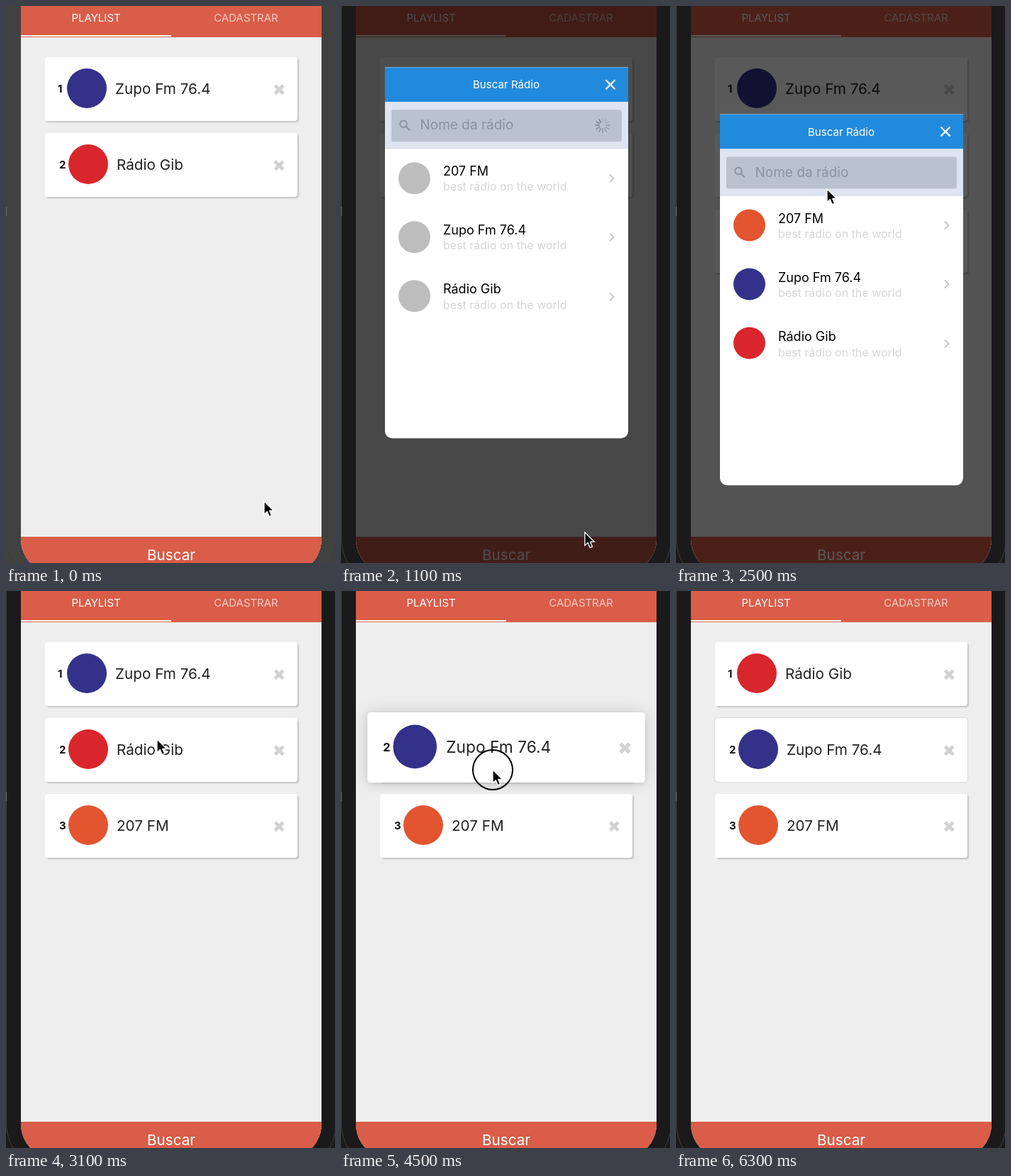
Animation, 464 px wide and 785 px high, one loop 6400 ms. Source, as an HTML page:

```html
<!DOCTYPE html>
<html lang="pt-BR">
<head>
<meta charset="utf-8">
<style>
  html, body { margin: 0; width: 100%; height: 100%; overflow: hidden; background: #1a1a1a; }
  div, svg { position: absolute; box-sizing: border-box; }
  svg { overflow: visible; left: 0; top: 0; }
  #stage { left: 0; top: 0; width: 464px; height: 785px; overflow: hidden; background: #1a1a1a;
    font-family: Inter, "Open Sans", sans-serif; }
  #stage.light { background: #414141; }
  .text { white-space: nowrap; line-height: 30px; height: 30px; }
  .mid { transform: translateX(-50%); }
  #edge { left: 0; top: -100px; width: 466px; height: 922px; border-radius: 72px; border: 1px solid #3d3d3d; border-top: 0; }
  #mark { left: 0; top: 283px; width: 1px; height: 13px; background: #777; }
  #screen { left: 21px; top: -100px; width: 424px; height: 901px; border-radius: 50px; overflow: hidden; background: #eee; }
  #page { left: -21px; top: 100px; width: 464px; height: 801px; }
  #tabs { left: 21px; top: 0; width: 424px; height: 43.5px; background: #d95d48; }
  #line { left: 21px; top: 41.3px; width: 212px; height: 2.2px; background: #fff; }
  #button { left: 21px; top: 748px; width: 424px; height: 53px; background: #d95d48; }
  .tab { top: 1.5px; font-size: 15px; color: #fff; }
  .card { left: 55px; top: 72px; width: 356px; height: 90px; border-radius: 4px; background: #fff; }
  .body { left: 0; top: 0; }
  .num { left: 18px; top: 30px; font-size: 15px; font-weight: 700; color: #111; }
  .logo { left: 31px; top: 16px; width: 56px; height: 56px; border-radius: 50%; }
  .name { left: 99px; top: 30px; font-size: 20.7px; color: #222; }
  #dim { left: 0; top: 0; width: 464px; height: 801px; background: #000; }
  #modal { left: 61.5px; top: 86px; width: 343px; height: 523px; border-radius: 0 0 10px 10px; overflow: hidden; background: #fff; }
  #head { left: 0; top: 0; width: 100%; height: 49px; background: #228adc; }
  #search { left: 0; top: 49px; width: 100%; height: 66px; background: #dfe5f0; border-bottom: 1px solid #d8dde6; }
  #field { left: 9px; top: 11px; width: 325px; height: 45px; border-radius: 3px; background: #bac2d0; }
  .item { left: 0; width: 100%; height: 83px; }
  .avatar { left: 19px; top: 18.5px; width: 45px; height: 45px; border-radius: 50%; }
  .title { left: 82.5px; top: 16.5px; font-size: 18px; color: #000; }
  .sub { left: 82.5px; top: 38px; font-size: 16px; color: #d6d6d6; }
</style>
</head>
<body>
<div id="stage">
  <div id="edge"></div>
  <div id="mark"></div>
  <div id="screen"><div id="page">
    <div id="tabs"></div>
    <div id="line"></div>
    <div class="text mid tab" style="left:127px">PLAYLIST</div>
    <div class="text mid tab" style="left:338.5px;opacity:.68">CADASTRAR</div>
    <div id="cards"></div>
    <div id="button"><div class="text mid" style="left:212px;top:10.5px;font-size:20.7px;color:#fff">Buscar</div></div>
    <div id="dim"></div>
    <div id="modal">
      <div id="head">
        <div class="text mid" style="left:171.5px;top:10px;font-size:15.1px;color:#fff">Buscar Rádio</div>
        <svg><path d="M311.5 18l13 13m0-13l-13 13" stroke="#fff" stroke-width="2.4"/></svg>
      </div>
      <div id="search">
        <div id="field"></div>
        <svg fill="none" stroke="#8a929e" stroke-width="2"><circle cx="26" cy="31" r="4.8"/><path d="M29.5 34.5l5.5 5.5"/></svg>
        <div class="text" style="left:50px;top:18px;font-size:19px;color:#8a929e">Nome da rádio</div>
        <svg id="spinner"></svg>
      </div>
      <div id="items"></div>
    </div>
  </div></div>
  <svg id="ring"><circle r="28" fill="none" stroke="#000" stroke-width="2"/></svg>
  <svg id="cursor"><path d="M0 0V18.5L4.3 14.6 7.2 21.6 10.6 20.2 7.7 13.3H13.4Z" fill="#000" stroke="#fff" stroke-width="1.3"/></svg>
</div>
<script>
const LOOP = 6400, STEP = 100, PITCH = 107, GRAB_Y = 148.5;
const $ = id => document.getElementById(id);

const stations = {
  zupo: { name: 'Zupo Fm 76.4', color: '#34318a' },
  gib: { name: 'Rádio Gib', color: '#d9262c' },
  fm: { name: '207 FM', color: '#e2552f' }
};

// time, x, y of the pointer tip
const path = [
  [0, 364, 698], [600, 349, 762], [1000, 349, 762], [1800, 230, 291],
  [2200, 213, 258], [2700, 213, 258], [3100, 213, 209], [3500, 214, GRAB_Y],
  [3900, 214, GRAB_Y], [4500, 214, 252], [4900, 214, 255.5], [5500, 214, 255.5],
  [6200, 250, 800], [LOOP, 250, 800]
];
const presses = [[600, 800], [2300, 2400], [3500, 5400]];

const clamp = v => Math.min(1, Math.max(0, v));
const mix = (a, b, p) => a + (b - a) * p;
const within = (t, [a, b]) => t >= a && t < b;

// cubic-bezier(.25, .1, .25, 1)
function ease(x) {
  const curve = (a, b, u) => 3 * a * u * (1 - u) ** 2 + 3 * b * u * u * (1 - u) + u ** 3;
  let lo = 0, hi = 1;
  for (let i = 0; i < 24; i++) {
    const m = (lo + hi) / 2;
    if (curve(.25, .25, m) < x) lo = m; else hi = m;
  }
  return curve(.1, 1, lo);
}
const ramp = (t, start, length = 300) => {
  const x = clamp((t - start) / length);
  return x === 0 || x === 1 ? x : ease(x);
};

function pointer(t) {
  const i = Math.max(1, path.findIndex(p => p[0] > t));
  const [a, ax, ay] = path[i - 1], [b, bx, by] = path[i];
  const p = (t - a) / (b - a), s = p * p * (3 - 2 * p);
  return [mix(ax, bx, s), mix(ay, by, s)];
}

function add(parent, className, html) {
  const el = document.createElement('div');
  el.className = className;
  el.innerHTML = html;
  return parent.appendChild(el);
}

const cards = {};
for (const [key, s] of Object.entries(stations)) {
  const el = add($('cards'), 'card', `<div class="body"><div class="text num"></div>
    <div class="logo" style="background:${s.color}"></div><div class="text name">${s.name}</div></div>
    <svg><path d="M324.5 40l11.5 11.5m0-11.5l-11.5 11.5" stroke="#d2d2d2" stroke-width="4.8"/></svg>`);
  cards[key] = { el, body: el.querySelector('.body'), num: el.querySelector('.num') };
}

const avatars = ['fm', 'zupo', 'gib'].map((key, i) => {
  const el = add($('items'), 'item', `<div class="avatar"></div>
    <div class="text title">${stations[key].name}</div>
    <div class="text sub">best rádio on the world</div>
    <svg><path d="M317 36l5.5 5.5-5.5 5.5" fill="none" stroke="#c4c4c8" stroke-width="1.8"/></svg>`);
  el.style.top = 115 + i * 83.3 + 'px';
  return { el: el.firstChild, color: stations[key].color };
});

$('spinner').innerHTML = Array.from({ length: 12 }, (_, i) =>
  `<path d="M0-5V-10" stroke="#7d8593" stroke-width="1.8" stroke-linecap="round" transform="translate(307 33) rotate(${i * 30})"/>`).join('');
const spokes = [...$('spinner').children];

function place(card, number, y, scale, shadow) {
  card.num.textContent = number;
  card.body.style.left = (number === 1 ? 0 : 2) + 'px';
  card.el.style.transform = `translateY(${y}px) scale(${scale})`;
  card.el.style.boxShadow = shadow;
}

function draw(t) {
  const [x, y] = pointer(t);
  const at = `translate(${x}px, ${y}px)`;
  $('cursor').style.transform = $('ring').style.transform = at;
  $('ring').style.display = presses.some(p => within(t, p)) ? '' : 'none';
  $('stage').classList.toggle('light', t < 100);

  const open = ramp(t, 807) - ramp(t, 2474.6);
  $('dim').style.opacity = .7 * open;
  $('modal').style.transform = `translateY(${916 * (1 - open)}px)`;
  $('button').style.opacity = 1 - .78 * (ramp(t, 650, 150) - ramp(t, 900, 250));

  const loaded = t >= 1300;
  $('spinner').style.display = loaded ? 'none' : '';
  spokes.forEach((s, i) => s.style.opacity = 1 - ((t / STEP - i + 120) % 12) / 14);
  avatars.forEach(a => a.el.style.background = loaded ? a.color : '#bdbdbd');

  const flat = '2px 2px 2px rgba(0,0,0,.18)';
  const swapped = t >= 4500;
  const lift = ramp(t, 3700) - ramp(t, 5400);
  const drag = t < 3900 ? 0 : t < 5400 ? y - GRAB_Y : PITCH;
  const glow = t < 3700 ? flat :
    `0 0 ${mix(2, 20, lift)}px rgba(0,0,0,${mix(.24, .16, lift)}), 0 ${2 * lift}px ${mix(1, 6, lift)}px rgba(0,0,0,.08)`;
  place(cards.zupo, swapped ? 2 : 1, drag, 1 + .1 * lift, glow);
  cards.zupo.el.style.zIndex = t >= 3700 ? 1 : 0;
  place(cards.gib, swapped ? 1 : 2, PITCH * (1 - ramp(t, 4500)), 1, flat);
  place(cards.fm, 3, 2 * PITCH, 1, flat);
  cards.fm.el.style.display = t >= 2400 ? '' : 'none';
}

$('cards').style.zIndex = 0;
function tick() {
  draw(Math.floor(performance.now() % LOOP / STEP) * STEP);
  requestAnimationFrame(tick);
}
tick();
</script>
</body>
</html>
```
